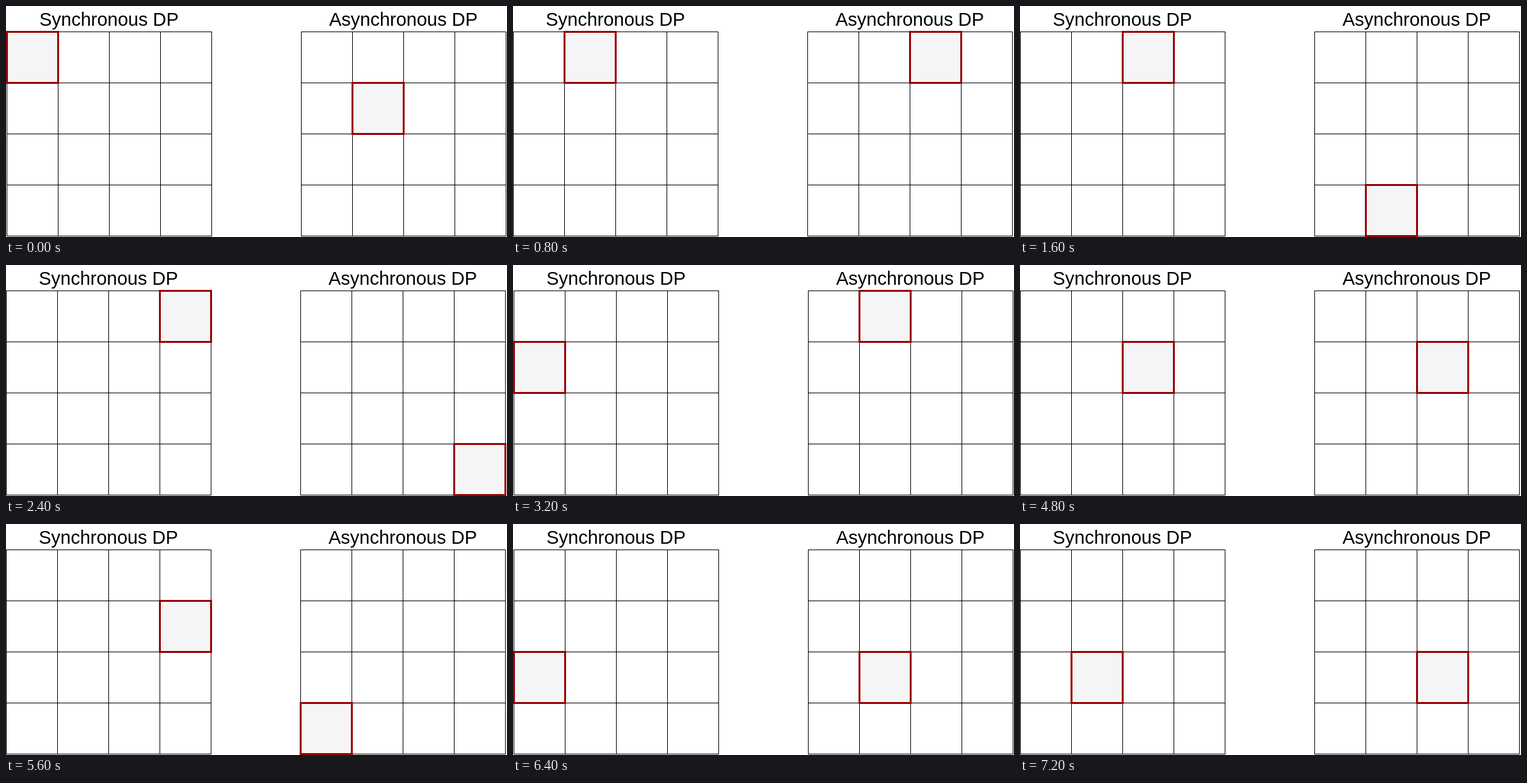
These frames come from a looping animation (783x362 px, 8000 ms). An HTML page with a canvas:

```html
<!DOCTYPE html>
<html lang="en">
<head>
<meta charset="utf-8">
<title>Synchronous and asynchronous DP</title>
<style>
  html, body { margin: 0; width: 100%; height: 100%; overflow: hidden; background: #fff; }
  canvas { display: block; }
</style>
</head>
<body>
<canvas id="stage" width="783" height="362"></canvas>
<script>
const ctx = document.getElementById('stage').getContext('2d');
const CELL = 80, SIZE = 4, TOP = 40, STEP = 800;

// Asynchronous visiting order as [column, row]; the synchronous sweep is row by row.
const order = [[1, 1], [2, 0], [1, 3], [3, 3], [1, 0], [0, 1], [2, 1], [0, 3], [1, 2], [2, 2]];

function drawGrid(title, left, [col, row]) {
  const span = CELL * SIZE;
  ctx.fillStyle = '#000';
  ctx.fillText(title, left + span / 2, 31);
  for (let i = 0; i <= SIZE; i++) {
    ctx.fillRect(left + i * CELL, TOP, 1, span + 1);
    ctx.fillRect(left, TOP + i * CELL, span + 1, 1);
  }
  const x = left + col * CELL, y = TOP + row * CELL;
  ctx.fillStyle = '#f5f5f5';
  ctx.fillRect(x, y, CELL, CELL);
  ctx.strokeStyle = '#990000';
  ctx.lineWidth = 3;
  ctx.strokeRect(x + 0.5, y + 0.5, CELL, CELL);
}

function draw(now) {
  const step = Math.floor(now / STEP) % order.length;
  const sweep = [step % SIZE, Math.floor(step / SIZE)];
  // The thick border on the left edge pushes everything one pixel to the right.
  const shift = sweep[0] === 0 ? 1 : 0;

  ctx.fillStyle = '#fff';
  ctx.fillRect(0, 0, 783, 362);
  ctx.font = '29px "Liberation Sans", Arial, sans-serif';
  ctx.textAlign = 'center';
  drawGrid('Synchronous DP', shift, sweep);
  drawGrid('Asynchronous DP', 460 + shift, order[step]);
}

const start = performance.now();
function tick() {
  draw(performance.now() - start);
  requestAnimationFrame(tick);
}
tick();
</script>
</body>
</html>
```
